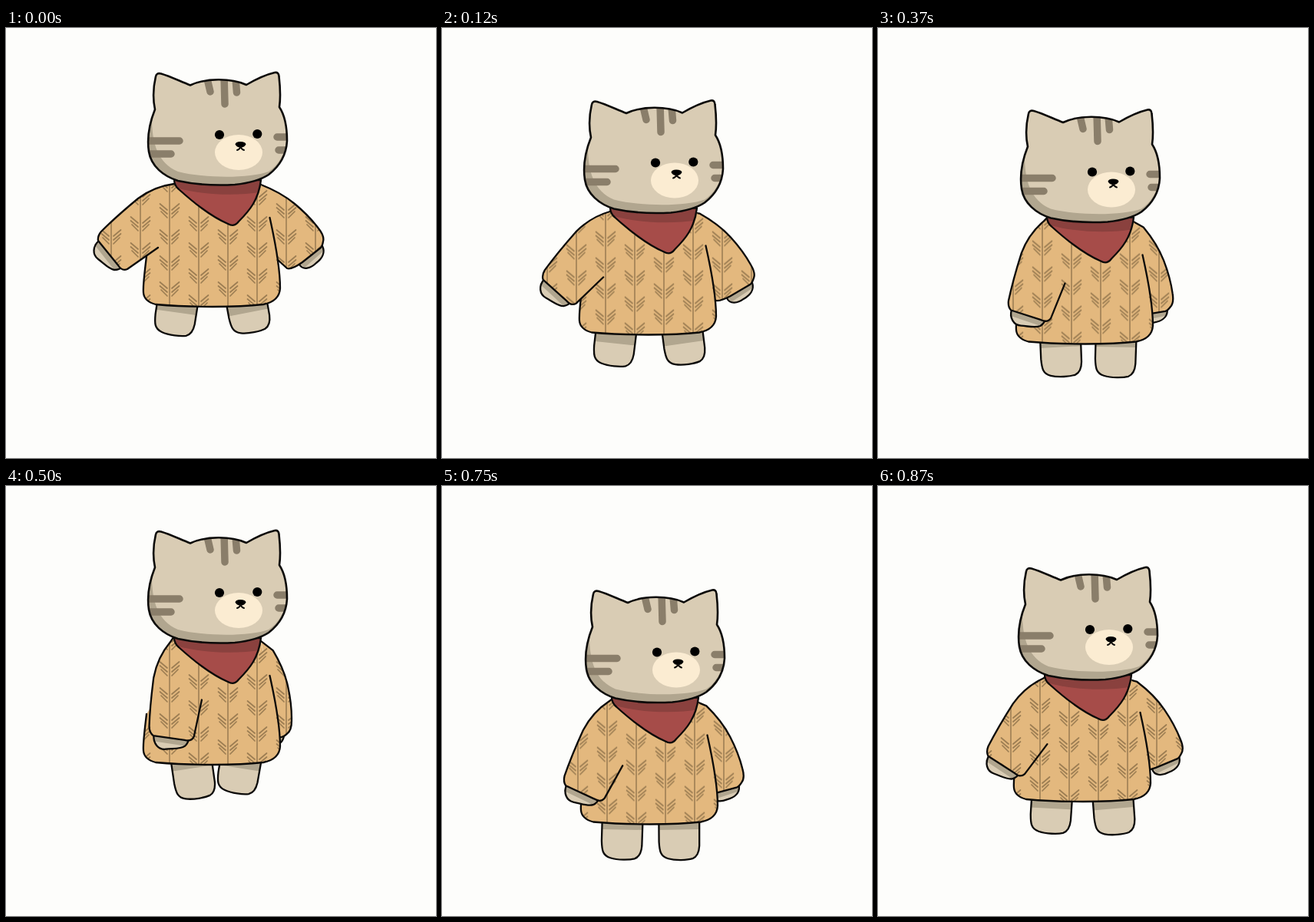
Animation of 560x560 px, one loop 1 s. Source, as an HTML page:

```html
<!DOCTYPE html>
<html lang="en">
<head>
<meta charset="utf-8">
<title>Jumping cat</title>
<style>
  html, body { margin: 0; width: 100%; height: 100%; overflow: hidden; background: #fdfdfb; }
  svg { display: block; width: 100vw; height: 100vh; }
  .ink { fill: none; stroke: #0b0a09; stroke-width: 2.3; stroke-linecap: round; stroke-linejoin: round; }
  .fur { fill: #d9ccb4; }
  .shade { fill: #b1a68f; }
  .knit { fill: url(#knit); }
  .stripe { fill: none; stroke: #8a7e6a; stroke-width: 9.5; stroke-linecap: round; }
</style>
</head>
<body>
<svg viewBox="0 0 560 560">
  <defs>
    <pattern id="knit" patternUnits="userSpaceOnUse" x="194" y="221" width="76" height="34">
      <rect width="76" height="34" fill="#e3b87e"/>
      <path id="yarn" fill="none" stroke="#9c7d52" stroke-width="1.7" stroke-linecap="round"/>
      <path d="M19,0V34M57,0V34" stroke="#94764d" stroke-width="1.4"/>
    </pattern>
    <path id="leg" d="M-26,-75 L-26.5,-24 C-26,-12 -25,-5 -15,-2 C-5,1 10,0.5 17,-1.5 C23,-4 25.5,-10 26,-18 L27,-75"/>
    <clipPath id="legClip"><use href="#leg"/></clipPath>
    <path id="head" d="M194,106 C191,92 192,76 195,63 Q196,58 202,59.5 C214,63 228,70 240,74.5 C260,65 293,65 313,74 C325,67 337,61 350,58 Q355,57 355.5,63 C357,76 358,89 356,103 C362,112 366,128 366,147 C365,166 355,181 342,191 C330,199 316,202 298,204 C270,205.500 242,203 224,199 C205,193 189,180 186,161 C183,141 188,121 194,106 Z"/>
    <clipPath id="headClip"><use href="#head"/></clipPath>
    <path id="scarf" d="M219,197 Q219,205 225,210 C246,229 270,247 289,255 Q297,260 303,252 C317,238 329,224 332,198 Z"/>
    <clipPath id="scarfClip"><use href="#scarf"/></clipPath>
  </defs>
  <rect width="560" height="560" fill="#fdfdfb"/>
  <g id="cat">
    <g id="legL"></g>
    <g id="legR"></g>
    <g id="armR"></g>
    <path class="knit" d="M222,198 L215,212 L200,270 L183,297 C181,315 178,335 179,345 Q180,356 195,360 C240,364 300,364 335,360 Q356,356 357,339 C357,315 352,285 343,246 L331,200 Z"/>
    <path class="ink" d="M183,297 C181,315 178,335 179,345 Q180,356 195,360 C240,364 300,364 335,360 Q356,356 357,339 C357,315 352,285 343.500,247"/>
    <g id="armL"></g>
    <use href="#scarf" fill="#a64c49"/>
    <path clip-path="url(#scarfClip)" fill="#8a413e" d="M210,190 H340 V212 C310,219 260,219 222,208 Z"/>
    <use href="#scarf" class="ink"/>
    <use href="#head" class="fur"/>
    <g clip-path="url(#headClip)">
      <path class="shade" d="M190,108 C189,148 196,175 224,187 C258,196 318,196 342,187 C354,180 361,166 367,150 L385,215 H170 V108 Z"/>
      <path class="stripe" d="M180,147H226M180,164H215M353,142H372M355,159H372M262,66L266,83M284,62L285,99M299,66L300.500,84"/>
    </g>
    <use href="#head" class="ink" style="stroke-width:2.6"/>
    <ellipse cx="303" cy="162" rx="31" ry="23" fill="#fbecd2"/>
    <circle cx="278" cy="139" r="6.1"/>
    <circle cx="327.300" cy="138" r="6.1"/>
    <path d="M298.500,151.500 Q299,148 305,148 Q312,148 312.500,151.500 Q311,155 305.500,156 Q300,155 298.500,151.500 Z"/>
    <path class="ink" style="stroke-width:2" d="M301,159 Q304.500,158 305.500,154.500 Q306.500,158 310,159"/>
  </g>
</svg>
<script>
const $ = id => document.getElementById(id);

// Start time, shift x, shift y, arm angle, leg shadow, left foot x/y/angle, right foot x/y/angle
const poses = [
  [0,    0,  0,    0,  9, 217.5, 400,   8, 321,   396.5, -11],
  [120,  0, 36.5,  9, 13, 222,   403.5, 6, 319,   401.5, -8],
  [250,  1, 77.5, 21, 9,  229,   409,   3, 312,   409,   -4],
  [370,  1, 48.5, 33, 6,  239,   405.5, -3, 308,  406.5, 1],
  [500,  0, 0,    43, 6,  249,   407,  -9, 299,   400,   9],
  [620, -1, 25,   40, 8,  247,   407,  -7, 301,   401.5, 7],
  [750,  2, 77.5, 26, 9,  232,   409,   1, 307.5, 409.5, -1],
  [870, -2, 48,   18, 11, 226,   404.5, 3, 312,   406,   -5]
];

const left = {
  pivot: [217, 210],
  hand: "M121,277 C113,284 112,295 120,301 C128,307 134,314 141,315 Q148,315 151,311",
  cuff: "M121,276 L115,282 L141,315 L150,313 Z",
  sleeve: "M232,200 L219,203 C203,205 187,211 172,222 C155,236 138,251 124,265 Q119,271 120,277 L146,309 Q151,317 158,314 L198,286",
  close: "L228,215 Z"
};
const right = {
  pivot: [325, 232],
  hand: "M412,284 C416,292 412,300 404,306 C397,313 387,316 382,308",
  cuff: "M411,285 L414,290 L389,312 L383,307 Z",
  sleeve: "M312,204 L332,204 C350,211 364,219 376,229 C388,239 398,249 407,261 Q415,271 413,278 Q412,284 410,286 L386,305 Q372,315 366,313 L354,302",
  close: "L322,212 Z"
};

// Turns the outline itself, so that the knit pattern stays upright.
function turn(d, [px, py], deg) {
  const a = deg * Math.PI / 180, c = Math.cos(a), s = Math.sin(a);
  return d.replace(/([\d.]+),([\d.]+)/g, (_, x, y) => {
    x -= px;
    y -= py;
    return (px + x * c - y * s).toFixed(2) + "," + (py + x * s + y * c).toFixed(2);
  });
}

const path = (cls, d) => `<path class="${cls}" d="${d}"/>`;

function arm(a, deg) {
  const t = d => turn(d, a.pivot, deg);
  const hand = t(a.hand), sleeve = t(a.sleeve);
  return path("fur", hand) + path("shade", t(a.cuff)) + path("ink", hand) +
    path("knit", sleeve + t(a.close)) + path("ink", sleeve);
}

function leg(g, x, y, deg, shadow) {
  g.setAttribute("transform", `translate(${x} ${y}) rotate(${deg})`);
  g.innerHTML = `<use href="#leg" class="fur"/>
    <rect class="shade" clip-path="url(#legClip)" x="-40" y="-80" width="80" height="${80 + 361 + shadow - y}"/>
    <use href="#leg" class="ink"/>`;
}

function chevron(x, y) {
  let d = "";
  for (const side of [-1, 1])
    for (let i = 0; i < 3; i++)
      d += `M${x + side * 3},${y + 9 - i * 5}L${x + side * (12.5 - (i === 0 ? 1.5 : 0))},${y + 1 - i * 5}`;
  return d;
}
$("yarn").setAttribute("d", chevron(19, 17) + chevron(57, 0) + chevron(57, 34));

let shown;
function draw(ms) {
  const pose = poses.filter(p => p[0] <= ms).pop();
  if (pose === shown) return;
  shown = pose;
  const [, dx, dy, swing, shadow, lx, ly, la, rx, ry, ra] = pose;
  $("cat").setAttribute("transform", `translate(${dx} ${dy})`);
  $("armL").innerHTML = arm(left, -swing);
  $("armR").innerHTML = arm(right, swing * 0.88);
  leg($("legL"), lx, ly, la, shadow);
  leg($("legR"), rx, ry, ra, shadow);
}

const start = performance.now();
function tick() {
  draw((performance.now() - start) % 1000);
  requestAnimationFrame(tick);
}
draw(0);
requestAnimationFrame(tick);
</script>
</body>
</html>
```
